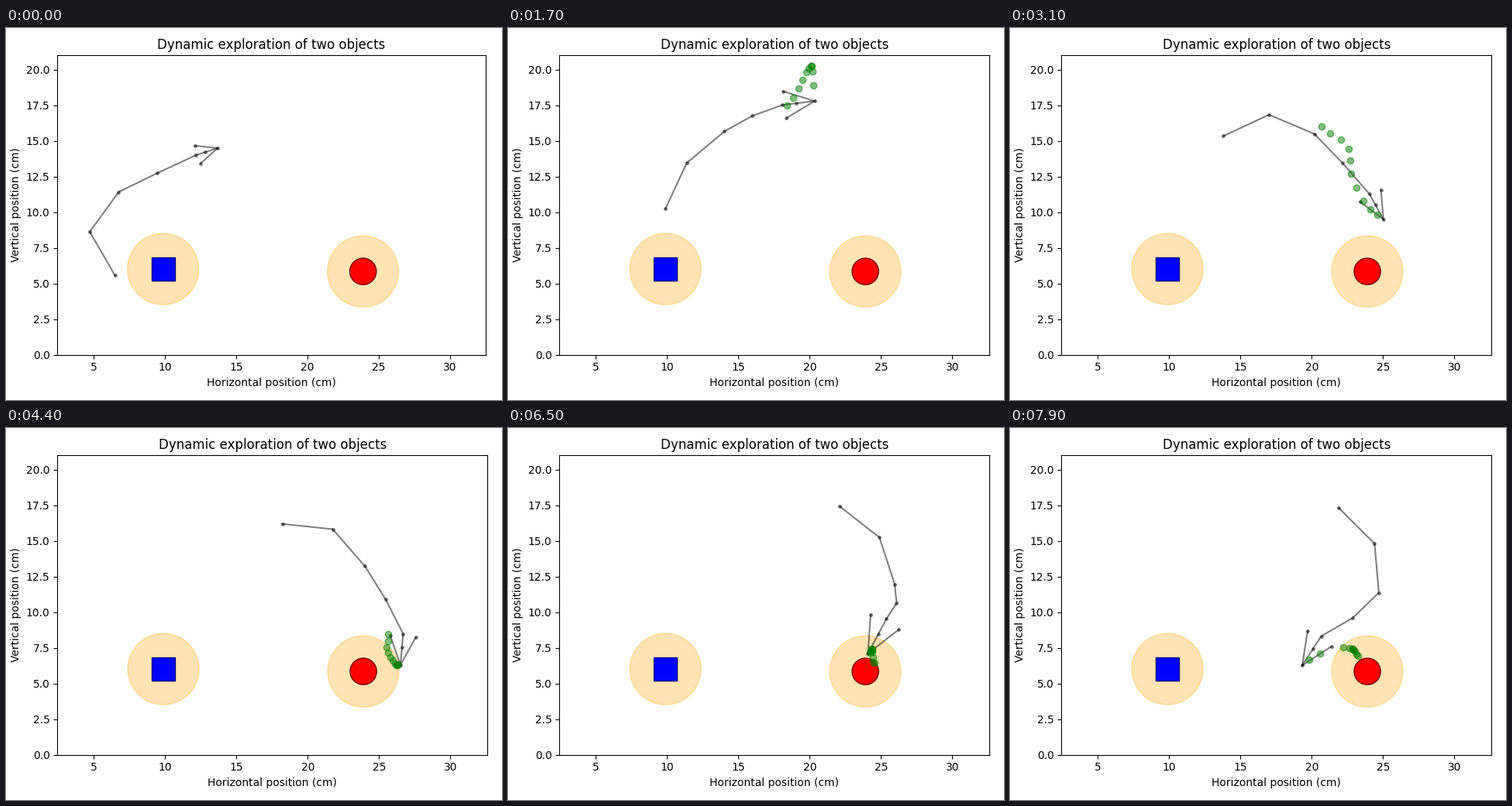
These frames come from a looping animation (640 px wide and 480 px high, 8 s). A matplotlib script:

```python
import numpy as np
import matplotlib.pyplot as plt
from matplotlib.animation import FuncAnimation
from matplotlib.patches import Circle, Rectangle

W, H, FRAMES, STEP = 640, 480, 80, 100
LEFT, BASE, SCALE = 66.4, 421.75, 18.4   # axes origin and pixels per cm
START_XLIM, XLIM, YLIM = (2.47, 32.5), (2.45, 32.59), (0, 21)
TRAIL = 10
EAR_SPREAD, NECK, HIND, TAIL = 24, 0.56, 3.45, 3.55

# Turning points of the nose: frame, x, y in cm
NOSE = [(0, 13.7, 14.5), (7, 18.4, 17.5), (12, 19.95, 20.1), (15, 20.18, 19.9),
        (17, 20.35, 17.8), (21, 20.7, 16), (24, 22.6, 14.45), (26, 22.75, 12.7),
        (28, 23.62, 10.8), (31, 25.03, 9.5), (34, 25.65, 8.45), (36, 25.55, 7.55),
        (40, 26.13, 6.4), (44, 26.5, 6.3), (46, 27.05, 6.05), (49, 26, 6.6),
        (52, 25.2, 6.7), (56, 24.45, 6.52), (58, 24.4, 7.2), (65, 24.08, 7.1),
        (69, 23.27, 6.95), (72, 22.9, 7.4), (75, 22.65, 7.48), (76, 22.2, 7.55),
        (77, 20.6, 7.1), (79, 19.33, 6.27)]

# Frame, head length, back link length, then link angles from head to tail
POSE = [(0, 1.6, 3.0, 198, 205, 206, 234, 300),
        (17, 2.3, 2.23, 187, 200, 209, 220, 245),
        (31, 2.05, 2.85, 119, 131, 134, 157, 205),
        (44, 2.2, 2.72, 85, 117, 122, 131, 174),
        (56, 3.05, 1.58, 59, 76, 109, 111, 158),
        (65, 2.75, 1.33, 62, 57, 96, 108, 142),
        (76, 2.5, 1.3, 60, 48, 50, 97, 134),
        (79, 2.45, 2.55, 57, 30, 44, 95, 135)]


def smooth(keys):
    """Hermite curve through keyed rows, sampled at every frame."""
    keys = np.array(keys, float)
    t, v = keys[:, 0], keys[:, 1:]
    slope = np.gradient(v, t, axis=0)
    f = np.arange(FRAMES)
    k = np.clip(np.searchsorted(t, f, side="right") - 1, 0, len(t) - 2)
    h = (t[k + 1] - t[k])[:, None]
    u = (f - t[k])[:, None] / h
    return ((1 + 2 * u) * (1 - u) ** 2 * v[k] + u * (1 - u) ** 2 * h * slope[k]
            + u * u * (3 - 2 * u) * v[k + 1] - u * u * (1 - u) * h * slope[k + 1])


def turn(degrees):
    return np.exp(1j * np.radians(degrees))


def set_points(line, z):
    line.set_data(np.real(z), np.imag(z))


nose = smooth(NOSE) @ [1, 1j]
pose = smooth(POSE)


def skeleton(i):
    """Spine from nose to tail, and the ear-nose-ear line."""
    head, back, *angles = pose[i]
    links = np.array([head, back, back, HIND, TAIL]) * turn(np.array(angles))
    spine = nose[i] + np.r_[0, NECK * links[0], np.cumsum(links)]
    ears = nose[i] + links[0] * np.array([turn(-EAR_SPREAD), 0, turn(EAR_SPREAD)])
    return spine, ears


fig = plt.figure(figsize=(W / 100, H / 100), dpi=100)
ax = fig.add_axes([0.1, 0.1, 0.8, 0.8])
ax.set(ylim=YLIM, title="Dynamic exploration of two objects",
       xlabel="Horizontal position (cm)", ylabel="Vertical position (cm)")
ax.set_xticks(range(5, 31, 5))
ax.set_yticks(np.arange(0, 20.1, 2.5))

BLUE, RED, HALF = (9.88, 6.02), (23.9, 5.85), 0.81
for c in (BLUE, RED):
    ax.add_patch(Circle(c, 2.5, color="orange", alpha=0.3))
ax.add_patch(Rectangle((BLUE[0] - HALF, BLUE[1] - HALF), 2 * HALF, 2 * HALF,
                       fc="blue", ec="#000080", lw=1))
ax.add_patch(Circle(RED, 0.93, fc="red", ec="#700000", lw=1))

joint = dict(alpha=0.5, ms=5.5, mew=0.6)
spine_line, = ax.plot([], [], "k.-", **joint)
ear_line, = ax.plot([], [], "k.-", markevery=2, **joint)
trail, = ax.plot([], [], "go", alpha=0.5)


def update(i):
    # The plot widens slightly once the trail appears
    xlim = XLIM if i else START_XLIM
    ax.set_xlim(xlim)
    ax.set_position([LEFT / W, 1 - BASE / H,
                     (xlim[1] - xlim[0]) * SCALE / W, YLIM[1] * SCALE / H])
    spine, ears = skeleton(i)
    set_points(spine_line, spine)
    set_points(ear_line, ears)
    set_points(trail, nose[max(0, i - TRAIL):i])
    return spine_line, ear_line, trail


anim = FuncAnimation(fig, update, frames=FRAMES, interval=STEP,
                     repeat=True, repeat_delay=0)
plt.show()
```
